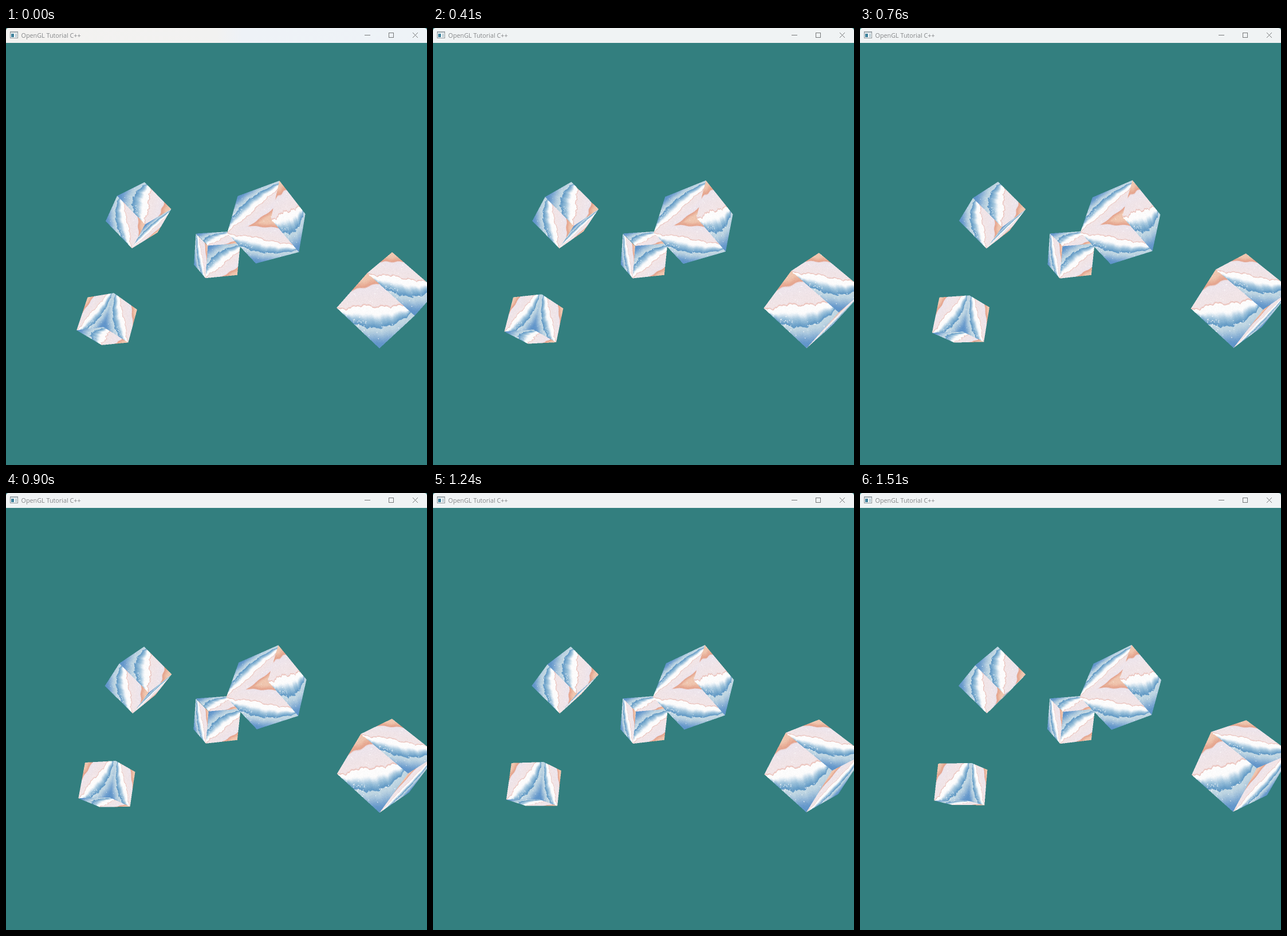
Animation of 735 by 762 pixels, one loop 1.58 s. Source, as an HTML page with a canvas:

```html
<!DOCTYPE html>
<html lang="en">
<head>
<meta charset="utf-8">
<title>OpenGL Tutorial C++</title>
<style>
html, body { margin: 0; width: 100%; height: 100%; overflow: hidden; background: #337f7f; }
canvas, svg { position: absolute; left: 0; top: 0; display: block; }
text { font: 10.8px "Open Sans", "Noto Sans", sans-serif; fill: #858789; }
</style>
</head>
<body>
<canvas id="stage" width="735" height="762"></canvas>
<svg width="735" height="762" viewBox="0 0 735 762">
  <defs>
    <linearGradient id="warm">
      <stop offset="0" stop-color="#f3f2f0"/>
      <stop offset=".5" stop-color="#f2f2f1"/>
      <stop offset=".56" stop-color="#eef2f7"/>
      <stop offset="1" stop-color="#eef3f7"/>
    </linearGradient>
  </defs>
  <path id="bar" d="M0 26V5Q0 0 5 0H730Q735 0 735 5V26Z" fill="#f0f3f4"/>
  <g shape-rendering="crispEdges">
    <rect x="7.5" y="6.5" width="13" height="11" fill="#fff" stroke="#8b9499"/>
    <rect x="8" y="7" width="12" height="2" fill="#c3cdd2"/>
    <rect x="9" y="10" width="5" height="6" fill="#3f829c"/>
    <rect x="16" y="10" width="3" height="6" fill="#b9cbd2"/>
  </g>
  <text x="26.5" y="16.7">OpenGL Tutorial C++</text>
  <g fill="none" stroke="#77797a">
    <path d="M626 12.5H636"/>
    <rect x="668.5" y="8.5" width="8" height="8"/>
    <path d="M710 8L719 17M719 8L710 17"/>
  </g>
</svg>
<script>
const LOOP = 1580, STEP = 68.65, LAST = 22;
const SS = 2, W = 735 * SS, TOP = 255, H = 315 * SS;
const N = 192;

const mix = (a, b, k) => a.map((v, i) => v + (b[i] - v) * k);
const clamp = v => Math.max(0, Math.min(1, v));
const smooth = (lo, hi, v) => { const k = clamp((v - lo) / (hi - lo)); return k * k * (3 - 2 * k); };

let seed = 7;
function rnd() {
  seed = (seed * 16807) % 2147483647;
  return seed / 2147483647;
}

const WHITE = [255, 254, 254], LILAC = [237, 229, 237], BLUSH = [242, 229, 231],
  PINK = [234, 184, 174], PEACH = [240, 198, 175], CORAL = [230, 166, 143],
  SKY = [150, 190, 217], DEEP = [100, 155, 198], MIST = [196, 217, 228], SEA = [98, 150, 203];

const lump = (b, f, o) => Math.abs(Math.sin(f * b + o));

// Watercolour hills: a peach corner, a cloud bank, then two blue slopes
function paint(s, t) {
  const a = s + 0.73 * t, b = t - s;
  const sun = s + 0.53 * t - 0.25 - 0.014 * Math.sin(15 * b);
  if (sun < 0) return mix(PEACH, CORAL, smooth(-0.15, 0, sun));
  const cloud = 0.82 - 0.06 * Math.exp(-(((b - 0.3) / 0.25) ** 2))
    - 0.05 * lump(b, 8, 0.5) - 0.022 * lump(b, 21, 0);
  const ridge = 1.29 - 0.37 * b * b - 0.045 * lump(b, 9, 1) - 0.015 * lump(b, 24, 0.4);
  if (a < cloud) {
    let c = mix(LILAC, BLUSH, smooth(0.2, 0.7, a));
    c = mix(c, PINK, 0.9 * smooth(cloud - 0.045, cloud, a));
    return mix(c, PINK, 0.7 * (1 - smooth(0, 0.025, sun)));
  }
  if (a < ridge) {
    const k = (a - cloud) / (ridge - cloud);
    return mix(mix(WHITE, SKY, smooth(0.3, 0.75, k)), DEEP, smooth(0.65, 1, k));
  }
  return mix(MIST, SEA, smooth(ridge, 1.66, a));
}

const pack = c => (255 << 24 | c[2] << 16 | c[1] << 8 | c[0]) >>> 0;

function makeTexture() {
  const cols = [];
  for (let j = 0; j < N; j++)
    for (let i = 0; i < N; i++) {
      const grain = (rnd() - 0.5) * 16;
      cols.push(paint((i + 0.5) / N, (j + 0.5) / N).map(v => Math.max(0, Math.min(255, v + grain))));
    }
  for (let n = 0; n < 60; n++) {
    const near = n < 22;
    const s = near ? 0.35 + 0.3 * rnd() : rnd(), t = near ? 0.75 + 0.24 * rnd() : rnd();
    const r = 1 + rnd() * 1.1, x = s * N, y = t * N;
    for (let j = Math.max(0, Math.floor(y - 2)); j < Math.min(N, y + 3); j++)
      for (let i = Math.max(0, Math.floor(x - 2)); i < Math.min(N, x + 3); i++)
        if (Math.hypot(i - x, j - y) < r) cols[j * N + i] = mix(cols[j * N + i], WHITE, 0.85);
  }
  return Uint32Array.from(cols, pack);
}

// Cube centres as x, y and distance from the camera; 45 degree lens
const LENS = 367.5 / Math.tan(Math.PI / 8);
const cubes = [[0, 0, 15], [1, 0.61, 10], [-2, 1, 13], [3, -0.8, 9], [-3, -1.8, 14]]
  .map((pos, i) => ({ pos, i }))
  .sort((a, b) => b.pos[2] - a.pos[2]);

// Neighbours turn opposite ways, each one further and faster than the last
function angle(i, k) {
  const deg = 31.5 + 25.3 * i + (3.6 + 5.3 * i) * k;
  return (i % 2 ? -deg : deg) * Math.PI / 180;
}

// Turns a point about the diagonal axis (1, 1, 0)
function turn([x, y, z], rad) {
  const q = Math.SQRT1_2, c = Math.cos(rad), s = Math.sin(rad);
  const along = (x + y) / 2 * (1 - c);
  return [x * c + q * z * s + along, y * c - q * z * s + along, z * c + q * (y - x) * s];
}

// Texture corners of the six faces; a corner number holds one bit per axis
const faces = [];
for (const on of [0, 1]) {
  const x = 4 * on, y = 2 * on, z = on;
  faces.push([x + 3, x + 1, x, x + 2], [y + 5, y + 1, y, y + 4], [z + 4, z, z + 2, z + 6]);
}
const half = bit => bit ? 0.5 : -0.5;
const corner = n => [half(n & 1), -half(n & 2), half(n & 4)];

function project([x, y, d]) {
  return [(367.5 + LENS * x / d) * SS, (394.5 - LENS * y / d - TOP) * SS];
}

// Fills a quad with the texture in true perspective
function drawFace(buf, tex, q) {
  const [[x0, y0], [x1, y1], [x2, y2], [x3, y3]] = q;
  const dx1 = x1 - x2, dx2 = x3 - x2, dy1 = y1 - y2, dy2 = y3 - y2;
  const sx = x0 - x1 + x2 - x3, sy = y0 - y1 + y2 - y3;
  const den = dx1 * dy2 - dx2 * dy1;
  if (Math.abs(den) < 1) return;
  const g = (sx * dy2 - dx2 * sy) / den, h = (dx1 * sy - sx * dy1) / den;
  const a = x1 - x0 + g * x1, b = x3 - x0 + h * x3;
  const d = y1 - y0 + g * y1, e = y3 - y0 + h * y3;
  const xs = q.map(p => p[0]), ys = q.map(p => p[1]);
  const left = Math.max(0, Math.floor(Math.min(...xs))), right = Math.min(W - 1, Math.ceil(Math.max(...xs)));
  const top = Math.max(0, Math.floor(Math.min(...ys))), bottom = Math.min(H - 1, Math.ceil(Math.max(...ys)));
  for (let j = top; j <= bottom; j++) {
    const y = j + 0.5;
    for (let i = left; i <= right; i++) {
      const x = i + 0.5;
      const w = (d * h - e * g) * x + (b * g - a * h) * y + a * e - b * d;
      const s = ((e - y0 * h) * x + (x0 * h - b) * y + b * y0 - x0 * e) / w;
      const t = ((y0 * g - d) * x + (a - x0 * g) * y + x0 * d - a * y0) / w;
      if (s >= 0 && s < 1 && t >= 0 && t < 1)
        buf[j * W + i] = tex[(t * N | 0) * N + (s * N | 0)];
    }
  }
}

function drawCube({ pos, i }, k) {
  const rad = angle(i, k);
  const pts = [...Array(8).keys()].map(n => {
    const [x, y, z] = turn(corner(n), rad);
    return [pos[0] + x, pos[1] + y, pos[2] - z];
  });
  for (const face of faces) {
    const quad = face.map(n => pts[n]);
    const mid = pos.map((_, c) => (quad[0][c] + quad[2][c]) / 2);
    const facing = mid.reduce((sum, v, c) => sum + v * (v - pos[c]), 0);
    if (facing < 0) drawFace(buf, tex, quad.map(project));
  }
}

const tex = makeTexture();
const ctx = document.getElementById("stage").getContext("2d");
const bar = document.getElementById("bar");
const layer = document.createElement("canvas");
layer.width = W;
layer.height = H;
const lctx = layer.getContext("2d");
const img = lctx.createImageData(W, H);
const buf = new Uint32Array(img.data.buffer);
const TEAL = pack([51, 127, 127]);

function draw(step) {
  buf.fill(TEAL);
  for (const cube of cubes) drawCube(cube, step / LAST);
  lctx.putImageData(img, 0, 0);
  ctx.fillStyle = "#337f7f";
  ctx.fillRect(0, 0, 735, 762);
  ctx.drawImage(layer, 0, TOP, W / SS, H / SS);
  bar.setAttribute("fill", step ? "#f0f3f4" : "url(#warm)");
}

let shown = -1;
const start = performance.now();
function tick() {
  const t = (performance.now() - start) % LOOP;
  const step = Math.min(LAST, Math.floor((t + 3) / STEP));
  if (step !== shown) draw(shown = step);
  requestAnimationFrame(tick);
}
tick();
</script>
</body>
</html>
```
